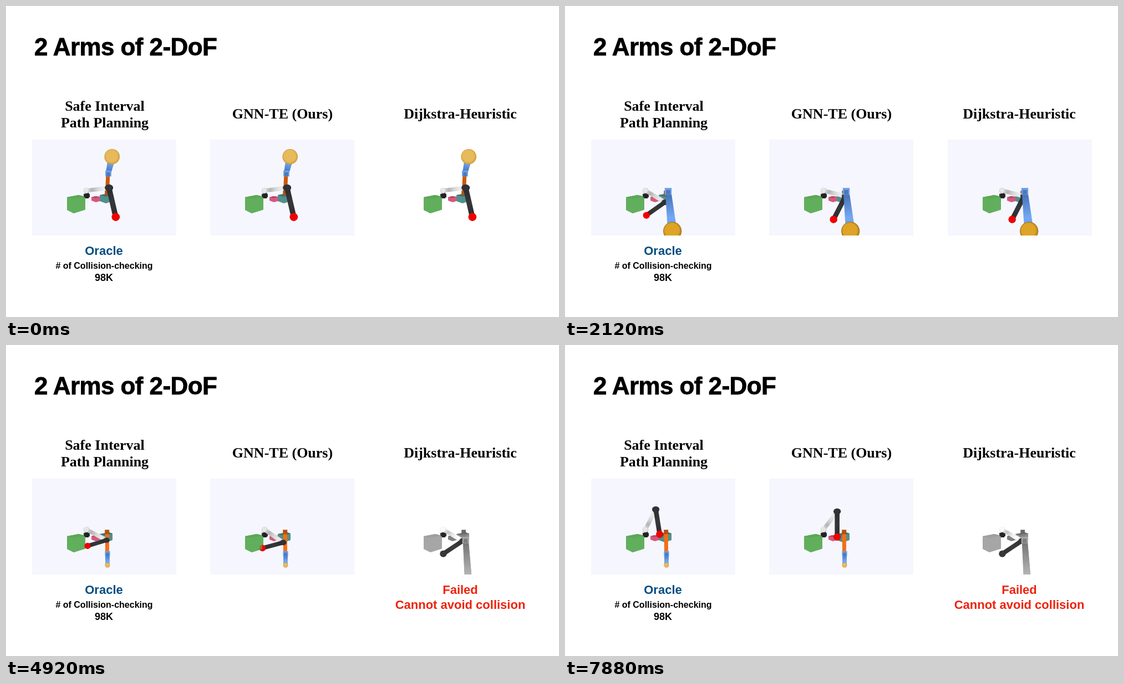
An HTML page with a canvas for the animation above (8000 ms loop, 997 px wide and 561 px high).

```html
<!DOCTYPE html>
<html lang="en">
<head>
<meta charset="utf-8">
<title>2 Arms of 2-DoF</title>
<style>
  html, body { margin: 0; width: 100%; height: 100%; overflow: hidden; background: #fff; }
  svg, canvas { position: absolute; top: 0; left: 0; }
  canvas { top: 241px; background: #f6f6fe; }
  canvas.idle { background: #fff; }
  canvas.failed { background: #fff; filter: grayscale(1) brightness(1.09); }
  text { text-anchor: middle; font: bold 22px "Liberation Sans", Arial, sans-serif; }
  .title { text-anchor: start; font-size: 44px; letter-spacing: -.6px; stroke: #000; stroke-width: .8px; }
  .head { font: bold 26px "Liberation Serif", "Times New Roman", serif; }
  .oracle { fill: #004d80; }
  .verdict { fill: #ee220c; }
</style>
</head>
<body>
<canvas width="260" height="173" style="left:47px"></canvas>
<canvas width="260" height="173" style="left:368px"></canvas>
<canvas width="260" height="173" style="left:690px"></canvas>
<svg width="997" height="561">
  <text class="title" x="51" y="89">2 Arms of 2-DoF</text>
  <text class="head" x="178" y="189">Safe Interval</text>
  <text class="head" x="178" y="219">Path Planning</text>
  <text class="head" x="498.5" y="203">GNN-TE (Ours)</text>
  <text class="head" x="819" y="203">Dijkstra-Heuristic</text>
  <text class="oracle" x="176.5" y="449">Oracle</text>
  <text x="177" y="473.5" style="font-size:16px"># of Collision-checking</text>
  <text x="176.5" y="496" style="font-size:18px">98K</text>
  <g class="verdict" id="verdict">
    <text x="819" y="449">Failed</text>
    <text x="819" y="476">Cannot avoid collision</text>
  </g>
</svg>
<script>
const LOOP = 8000, TICK = 40, START = 480, STEP = 96, FAIL = 3600;
const STUCK = 26, LOWERED = 47, LAST = 78;
const canvases = [...document.querySelectorAll('canvas')];
const verdict = document.getElementById('verdict');

// Black arm: each pose is upper angle, fore angle (degrees) and seen fore length.
const REST = [-7, 77, 54];
const ORACLE = { leave: 2, arrive: 28, turn: 38, reach: [54, 187, 33], end: [-63, 81, 45.5] };
const PLANNED = { leave: 7, arrive: 33, turn: 44, reach: [43, 172, 38], end: [-53, 90, 46] };
const PLANS = [ORACLE, PLANNED, PLANNED];

const rad = degrees => degrees * Math.PI / 180;
const mix = (a, b, u) => a + (b - a) * u;
const progress = (from, to, step) => Math.min(1, Math.max(0, (step - from) / (to - from)));

function blackPose(plan, step) {
  const out = progress(plan.leave, plan.arrive, step);
  const back = progress(plan.turn, LAST, step);
  const [upper, fore, length] = REST.map((v, i) => mix(mix(v, plan.reach[i], out), plan.end[i], back));
  const ex = 145 + 41 * Math.cos(rad(upper)), ey = 333 + 41 * Math.sin(rad(upper));
  return {
    ex, ey, r: 2 + length / 10,
    bx: ex + length * Math.cos(rad(fore)), by: ey + length * Math.sin(rad(fore))
  };
}

// Blue arm: both joints turn evenly in a plane towards the camera; near parts look larger.
function bluePose(step) {
  const u = progress(0, LOWERED, step);
  const upper = rad(mix(-62, 90, u)), fore = rad(mix(-19.5, 167, u));
  const ex = 183 + 3 * Math.cos(upper), ey = 337 + 39.5 * Math.sin(upper);
  const r = 9.5 + 7.5 * Math.cos(fore - rad(35));
  return { ex, ey, r, u, half: 4.6 + 1.6 * Math.cos(upper), tx: 179 + .88 * r, ty: ey + 91 * Math.sin(fore) };
}

function shape(c, color, ...points) {
  c.fillStyle = color;
  c.beginPath();
  for (let i = 0; i < points.length; i += 2) c.lineTo(points[i], points[i + 1]);
  c.fill();
}

function box(c, color, x, y, rx, ry = rx) {
  c.fillStyle = color;
  c.fillRect(x - rx, y - ry, 2 * rx, 2 * ry);
}

function ball(c, x, y, r, light, dark, stretch = 1) {
  const g = c.createRadialGradient(x - r * .2, y - r * .3, r * .2, x, y, r * stretch);
  g.addColorStop(.7, light);
  g.addColorStop(1, dark);
  c.fillStyle = g;
  c.beginPath();
  c.ellipse(x, y, r * stretch, r, 0, 0, 7);
  c.fill();
}

function link(c, x0, y0, x1, y1, w0, w1, ...colors) {
  const d = Math.hypot(x1 - x0, y1 - y0) || 1;
  const nx = (y0 - y1) / d / 2, ny = (x1 - x0) / d / 2;
  const g = c.createLinearGradient(x0, y0, x1, y1);
  colors.forEach((color, i) => g.addColorStop(i / Math.max(1, colors.length - 1), color));
  shape(c, g, x0 + nx * w0, y0 + ny * w0, x1 + nx * w1, y1 + ny * w1,
    x1 - nx * w1, y1 - ny * w1, x0 - nx * w0, y0 - ny * w0);
}

function greenBox(c, alpha) {
  c.globalAlpha = alpha;
  shape(c, '#61b05c', 110, 345, 131, 341, 143, 344, 143, 367.5, 122, 374, 110, 368);
  shape(c, '#59a655', 110, 345, 131, 341, 143, 344, 122, 348);
  c.globalAlpha = 1;
}

function obstacles(c) {
  greenBox(c, 1);
  shape(c, '#d6587c', 154, 345, 161, 343, 169, 344, 169, 352, 162, 354, 154, 351);
  shape(c, '#b84468', 154, 345, 161, 343, 169, 344, 162, 346.5);
  shape(c, '#528f8b', 169, 341, 186, 338, 192, 340, 192, 352, 180, 356, 169, 352);
  shape(c, '#3d726f', 169, 341, 186, 338, 192, 340, 180, 344);
}

function blackArm(c, { ex, ey, bx, by, r }) {
  box(c, '#2c2c2e', 145.5, 342, 5.5, 3.2);
  box(c, '#222', 146, 342, 3.2, 5);
  link(c, 145, 333, ex, ey, 7, 8, '#e2e2e2', '#b4b4b4', '#d8d8d8', '#ececec', '#c8c8c8');
  ball(c, 145, 333, 5.3, '#e6e6e6', '#b9b9b9');
  link(c, ex, ey, bx, by, r * 1.3, r * 1.3, '#2b2c2e', '#35373a', '#2b2c2e');
  ball(c, ex, ey, r * .85, '#303236', '#242528', 1.18);
  ball(c, bx, by, r, '#f20000', '#d40000');
}

function drawScene(c, step, plan) {
  const { ex, ey, tx, ty, r, u, half } = bluePose(step);
  c.setTransform(1, 0, 0, 1, -47, -241);
  c.clearRect(47, 241, 260, 173);
  obstacles(c);

  const orange = `hsl(24 92% ${mix(42, 52, u)}%)`;
  link(c, 182.3, 341, ex - .5, ey, 7, 7, orange);
  box(c, '#b3500f', 182.2, 337.3, 4, 4);

  blackArm(c, blackPose(plan, step));

  // The green block is translucent, so a ball inside it shows through.
  c.save();
  c.beginPath();
  c.rect(108, 338, 33, 40);
  c.clip();
  greenBox(c, .65);
  c.restore();

  link(c, ex, ey, tx, ty, half * 1.7, Math.max(8, r), '#426a a6'.replace(' ', ''), '#5a8ad2', '#74a9f5', '#6698e6');
  box(c, '#6b9fe9', ex, ey, half);
  box(c, '#4a79ba', ex, ey + half * .25, half * .6, half * .65);
  const light = mix(63, 50, Math.sin(Math.PI * u));
  ball(c, tx, ty, r, `hsl(41 74% ${light}%)`, `hsl(39 62% ${light - 12}%)`);
}

function render(now) {
  const t = Math.floor(now % LOOP / TICK) * TICK;
  const step = t < START ? 0 : Math.floor((t - START) / STEP) + 1;
  const failed = t >= FAIL;
  canvases.forEach((canvas, i) => {
    drawScene(canvas.getContext('2d'), i === 2 ? Math.min(step, STUCK) : step, PLANS[i]);
  });
  canvases[2].className = failed ? 'failed' : step ? '' : 'idle';
  verdict.style.visibility = failed ? 'visible' : 'hidden';
  requestAnimationFrame(render);
}
render(performance.now());
</script>
</body>
</html>
```
